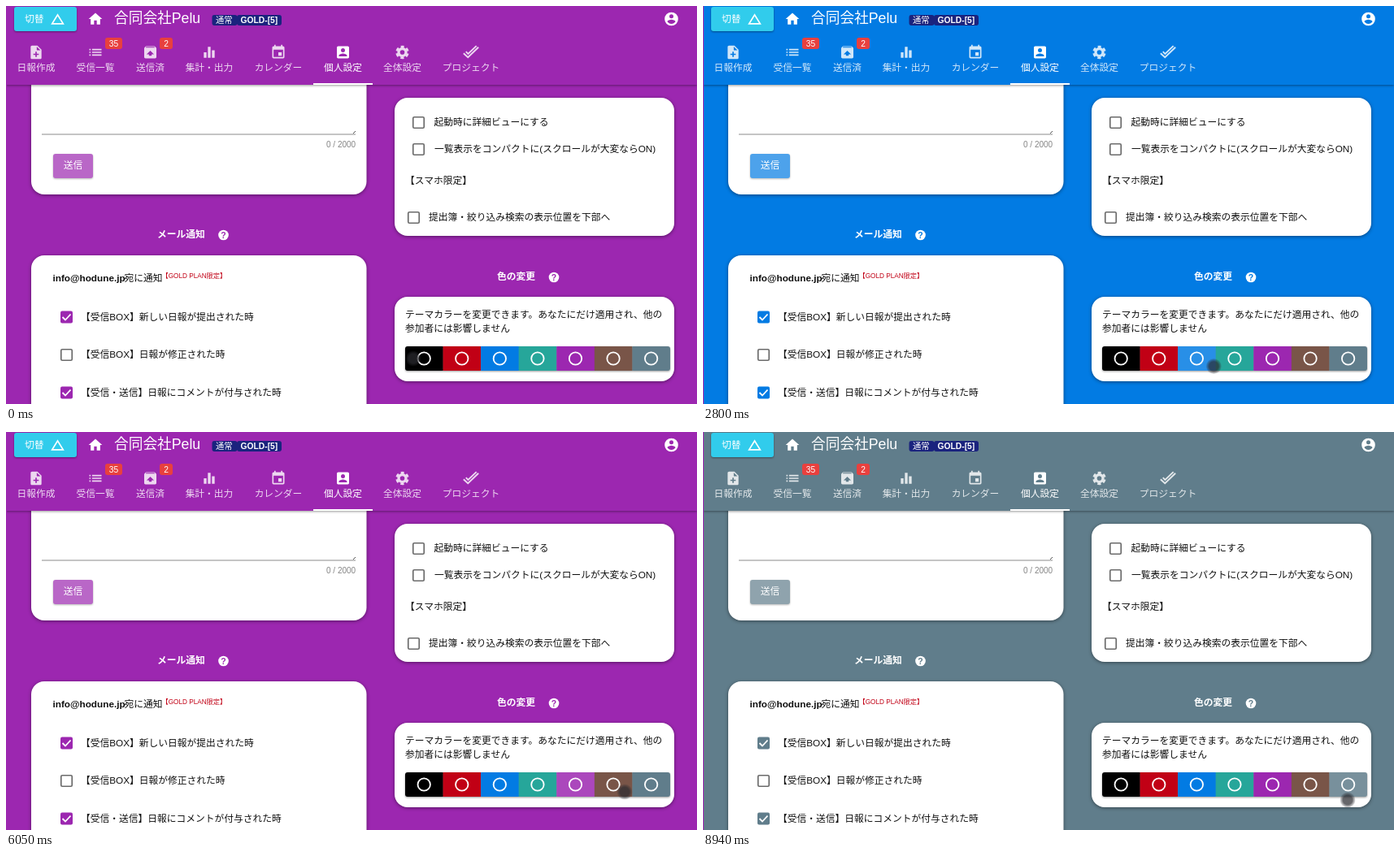
An HTML page for the animation above (9 s loop, 850x490 px).

```html
<!DOCTYPE html>
<html lang="ja">
<head>
<meta charset="utf-8">
<title>カラーテーマ</title>
<style>
html, body { margin: 0; width: 100%; height: 100%; overflow: hidden; }
svg { display: block; position: absolute; left: 0; top: 0; --theme: #9c27b0; }
text { font-family: "Liberation Sans", "Noto Sans CJK JP", "Noto Sans CJK", sans-serif; }
.theme { fill: var(--theme); }
.card { fill: #fff; filter: drop-shadow(0 1px 2px rgba(0,0,0,.45)); }
.lift { filter: drop-shadow(0 1px 1px rgba(0,0,0,.4)); }
</style>
</head>
<body>
<svg id="stage" width="850" height="490" viewBox="0 0 850 490"></svg>
<script>
const LOOP = 9000;
const COLORS = ['#000', '#c10015', '#027be3', '#26a69a', '#9c27b0', '#795548', '#607d8b'];
// one row per swatch: pointer down, pointer up, loader start
const CLICKS = [
  [90, 90, 60], [720, 870, 900], [2020, 2190, 2200], [3100, 3280, 3290],
  [4670, 4820, 4817], [6360, 6510, 6520], [8240, 8380, 8400]
];
const PATH = [
  [0, 501, 434], [240, 501, 434], [520, 549, 435], [1480, 549, 435], [1640, 602, 443],
  [2720, 602, 443], [2880, 654, 444], [3940, 654, 444], [4100, 696, 441], [5600, 696, 441],
  [6050, 761, 443], [7300, 761, 443], [7590, 783, 443], [7860, 783, 443], [7980, 793, 442],
  [8800, 793, 442], [8940, 793, 453], [LOOP, 793, 453]
];
const SWAP = 190, HIDE = 240, FADE = 230;

const ICONS = {
  note: 'M14 2H6c-1.1 0-2 .9-2 2v16c0 1.1.9 2 2 2h12c1.1 0 2-.9 2-2V8l-6-6zm2 14h-3v3h-2v-3H8v-2h3v-3h2v3h3v2zm-3-7V3.5L18.5 9H13z',
  list: 'M3 13h2v-2H3v2zm0 4h2v-2H3v2zm0-8h2V7H3v2zm4 4h14v-2H7v2zm0 4h14v-2H7v2zM7 7v2h14V7H7z',
  outbox: 'M20.5 5.2l-1.4-1.7Q18.7 3 18 3H6q-.7 0-1.2.5L3.5 5.2Q3 5.8 3 6.5V19c0 1.1.9 2 2 2h14c1.1 0 2-.9 2-2V6.5q0-.7-.5-1.3zM12 9.5l5.5 5.5H14v2h-4v-2H6.5L12 9.5zM5.1 5l.8-1h12l.9 1z',
  bars: 'M10 20h4V4h-4v16zm-6 0h4v-8H4v8zM16 9v11h4V9h-4z',
  event: 'M17 12h-5v5h5v-5zM16 1v2H8V1H6v2H5c-1.1 0-2 .9-2 2v14c0 1.1.9 2 2 2h14c1.1 0 2-.9 2-2V5c0-1.1-.9-2-2-2h-1V1h-2zm3 18H5V8h14v11z',
  person: 'M3 5v14c0 1.1.9 2 2 2h14c1.1 0 2-.9 2-2V5c0-1.1-.9-2-2-2H5c-1.1 0-2 .9-2 2zm12 4a3 3 0 1 1-6 0 3 3 0 0 1 6 0zm-9 8c0-2 4-3.1 6-3.1s6 1.1 6 3.1v1H6v-1z',
  home: 'M10 20v-6h4v6h5v-8h3L12 3 2 12h3v8z',
  account: 'M12 2a10 10 0 1 0 0 20 10 10 0 0 0 0-20zm0 3a3 3 0 1 1 0 6 3 3 0 0 1 0-6zm0 14.2c-2.5 0-4.7-1.3-6-3.2 0-2 4-3.1 6-3.1s6 1.1 6 3.1c-1.3 1.9-3.5 3.2-6 3.2z',
  triangle: 'M12 7.8L18.4 18H5.6L12 7.8M12 4L2 20h20L12 4z'
};
const GEAR = '<g fill="none" stroke="#fff"><circle cx="12" cy="12" r="5.4" stroke-width="4"/>' +
  '<circle cx="12" cy="12" r="8.3" stroke-width="3.2" stroke-dasharray="5 3.69" stroke-dashoffset="2.5" transform="rotate(-90 12 12)"/></g>';
const CHECKS = '<path d="M1 13.5l6.5 6L23 4.5M4.5 11l3.2 3.2L20 2.5" fill="none" stroke="#fff" stroke-width="2.3"/>';

const text = (x, y, s, o = {}) => {
  const size = o.size || 11.75;
  return `<text x="${x}" y="${y + size * .37}" font-size="${size}" fill="${o.fill || '#111'}"` +
    ` font-weight="${o.bold ? 700 : 400}" text-anchor="${o.mid ? 'middle' : 'start'}">${s}</text>`;
};
const rect = (x, y, w, h, r, attr) =>
  `<rect x="${x}" y="${y}" width="${w}" height="${h}" rx="${r}" ${attr}/>`;
const icon = (x, y, body, size = 20) =>
  `<g transform="translate(${x - size / 2} ${y - size / 2}) scale(${size / 24})" fill="#fff">` +
  (body[0] === '<' ? body : `<path d="${body}"/>`) + '</g>';
const checkbox = (x, y, on) => on
  ? rect(x - 7.5, y - 7.5, 15, 15, 2, 'class="theme"') +
    `<path d="M${x - 5} ${y}l3.5 3.5 6.5-7" fill="none" stroke="#fff" stroke-width="1.8"/>`
  : rect(x - 6.75, y - 6.75, 13.5, 13.5, 1.5, 'fill="#fff" stroke="#6b6b6b" stroke-width="1.7"');
const option = (x, y, label, tx, on) => checkbox(x, y, on) + text(tx, y - .5, label);
const heading = (x, y, label, hx) => text(x, y, label, { fill: '#fff', bold: 1 }) +
  `<circle cx="${hx}" cy="${y + 1}" r="6.3" fill="#fff"/>` +
  `<text x="${hx}" y="${y + 4.8}" font-size="10.5" font-weight="700" text-anchor="middle" class="theme">?</text>`;

const TABS = [
  [37, '日報作成', ICONS.note], [110, '受信一覧', ICONS.list], [177.5, '送信済', ICONS.outbox],
  [250, '集計・出力', ICONS.bars], [335, 'カレンダー', ICONS.event], [414.5, '個人設定', ICONS.person],
  [487.5, '全体設定', GEAR], [572, 'プロジェクト', CHECKS]
];
const badge = (x, w, s) => rect(x, 39, w, 14, 3, 'fill="#e8403e"') +
  text(x + w / 2, 46, s, { size: 10.2, fill: '#fff', mid: 1 });

const header = () =>
  rect(0, 0, 850, 97, 0, 'class="theme" style="filter:drop-shadow(0 1px 1.5px rgba(0,0,0,.4))"') +
  rect(10, 1, 77, 30, 3, 'fill="#31ccec" class="lift"') +
  text(23, 16, '切替', { fill: '#fff' }) + icon(63.5, 16, ICONS.triangle) +
  icon(110, 16, ICONS.home) + text(133, 14, '合同会社Pelu', { size: 17.7, fill: '#fff' }) +
  rect(253.5, 11, 31, 13, 3, 'fill="#1a237e"') + rect(284, 11, 55, 13, 3, 'fill="#1a237e"') +
  text(258, 17.5, '通常', { size: 10.3, fill: '#fff' }) +
  text(288.5, 17.5, 'GOLD-[5]', { size: 10.3, fill: '#fff', bold: 1 }) +
  icon(818.5, 16, ICONS.account) +
  TABS.map(([x, label, body], i) => `<g opacity="${i === 5 ? 1 : .82}">` +
    icon(x, 57, body) + text(x, 76, label, { fill: '#fff', mid: 1 }) + '</g>').join('') +
  badge(122, 21, '35') + badge(189, 16, '2') +
  rect(378, 95, 73, 2, 0, 'fill="#fff"');

const leftSide = () =>
  rect(31, 40, 412.5, 192, 16, 'class="card"') +
  '<path d="M44 158H430" stroke="#8a8a8a"/><path d="M427 157l3-3" stroke="#555"/>' +
  text(394, 170, '0 / 2000', { size: 10, fill: '#858585' }) +
  `<g opacity=".7">${rect(58, 182, 49, 30, 3, 'class="theme lift"')}</g>` +
  text(82.5, 196, '送信', { fill: '#fff', mid: 1 }) +
  heading(186, 281, 'メール通知', 267.5) +
  rect(31, 307, 412.5, 240, 16, 'class="card"') +
  text(57.5, 335, 'info@hodune.jp', { bold: 1 }) + text(145.5, 335, '宛に通知') +
  text(191.5, 332, '【GOLD PLAN限定】', { size: 8.2, fill: '#c10015' }) +
  option(74.5, 383, '【受信BOX】新しい日報が提出された時', 92, 1) +
  option(74.5, 429.5, '【受信BOX】日報が修正された時', 92) +
  option(74.5, 476, '【受信・送信】日報にコメントが付与された時', 92, 1);

const swatch = (c, i) => {
  const x = 491 + i * 46.57, box = a => rect(x, 419, 46.8, 30, 0, a);
  return box(`fill="${c}"`) + box('class="glow" fill="#fff" opacity="0"') +
    `<circle cx="${x + 23.2}" cy="434" r="7.7" fill="none" stroke="#fff" stroke-width="1.8"/>`;
};
const rightSide = () =>
  rect(478, 113, 344, 170, 16, 'class="card"') +
  option(507.5, 143.5, '起動時に詳細ビューにする', 526.5) +
  option(507.5, 176.5, '一覧表示をコンパクトに(スクロールが大変ならON)', 527) +
  text(491, 215, '【スマホ限定】') +
  option(501.5, 260.5, '提出簿・絞り込み検索の表示位置を下部へ', 520) +
  heading(604, 333, '色の変更', 674) +
  rect(478, 358, 344, 104, 16, 'class="card"') +
  text(491, 380, 'テーマカラーを変更できます。あなたにだけ適用され、他の') +
  text(491, 397, '参加者には影響しません') +
  `<g class="lift"><g clip-path="url(#strip)">${COLORS.map(swatch).join('')}</g></g>`;

const stage = document.getElementById('stage');
stage.innerHTML =
  `<defs><clipPath id="strip">${rect(491, 419, 326, 30, 3, '')}</clipPath>
  <radialGradient id="dark"><stop offset=".6" stop-color="#2b2b30" stop-opacity=".72"/>
  <stop offset="1" stop-color="#2b2b30" stop-opacity=".1"/></radialGradient></defs>` +
  rect(0, 0, 850, 490, 0, 'class="theme"') + leftSide() + rightSide() + header() +
  '<g id="loader">' + rect(0, 0, 850, 490, 0, 'fill="#000" opacity=".4"') +
  '<g transform="translate(426 289.5) scale(1.344)"><circle id="arc" r="20" fill="none" stroke="#fff" stroke-width="5"/></g>' +
  text(426.5, 364, 'カラーテーマ適用中', { fill: '#fff', mid: 1 }) + '</g>' +
  rect(0, 0, 1, 490, 0, 'fill="#9c27b0"') +
  '<circle id="pointer" r="9.5"/>';

const [loader, arc, pointer] = ['loader', 'arc', 'pointer'].map(id => document.getElementById(id));
const glows = [...stage.querySelectorAll('.glow')];
const clamp = v => Math.min(1, Math.max(0, v));

const loaderOpacity = t => t < HIDE ? clamp(t / FADE) : clamp(1 - (t - HIDE) / FADE);

function spin(t) {
  const p = clamp(t / 750), e = p * p * (3 - 2 * p);
  arc.setAttribute('stroke-dasharray', `${1 + 88 * e} 200`);
  arc.setAttribute('stroke-dashoffset', -35 * e);
  arc.setAttribute('transform', `rotate(${t * .18})`);
}

// a ripple that settles into a steady focus tint
function glowOpacity(t) {
  const p = clamp(t / 550);
  return .15 * clamp(2 * p) + .18 * Math.sin(Math.PI * p) ** 2;
}

function movePointer(t, pressed) {
  const i = PATH.findIndex(k => k[0] > t);
  const [t0, x0, y0] = PATH[i - 1], [t1, x1, y1] = PATH[i];
  const p = (t - t0) / (t1 - t0);
  pointer.setAttribute('cx', x0 + (x1 - x0) * p);
  pointer.setAttribute('cy', y0 + (y1 - y0) * p);
  pointer.setAttribute('fill', pressed ? 'rgba(208,196,20,.75)' : 'url(#dark)');
}

function render(now) {
  const t = now % LOOP;
  let theme = 4, focus = -1, pressed = false, opacity = 0;
  CLICKS.forEach(([down, up, start], i) => {
    if (t >= start + SWAP) theme = i;
    if (t >= up) focus = i;
    if (t >= down && t < up) pressed = true;
    const a = loaderOpacity(t - start);
    if (a > 0) { opacity = a; spin(t - start); }
  });
  stage.style.setProperty('--theme', COLORS[theme]);
  loader.setAttribute('opacity', opacity);
  glows.forEach((g, i) =>
    g.setAttribute('opacity', i === focus ? glowOpacity(t - CLICKS[i][1]) : 0));
  movePointer(t, pressed);
}

const origin = performance.now();
function tick() {
  render(performance.now() - origin);
  requestAnimationFrame(tick);
}
tick();
</script>
</body>
</html>
```
